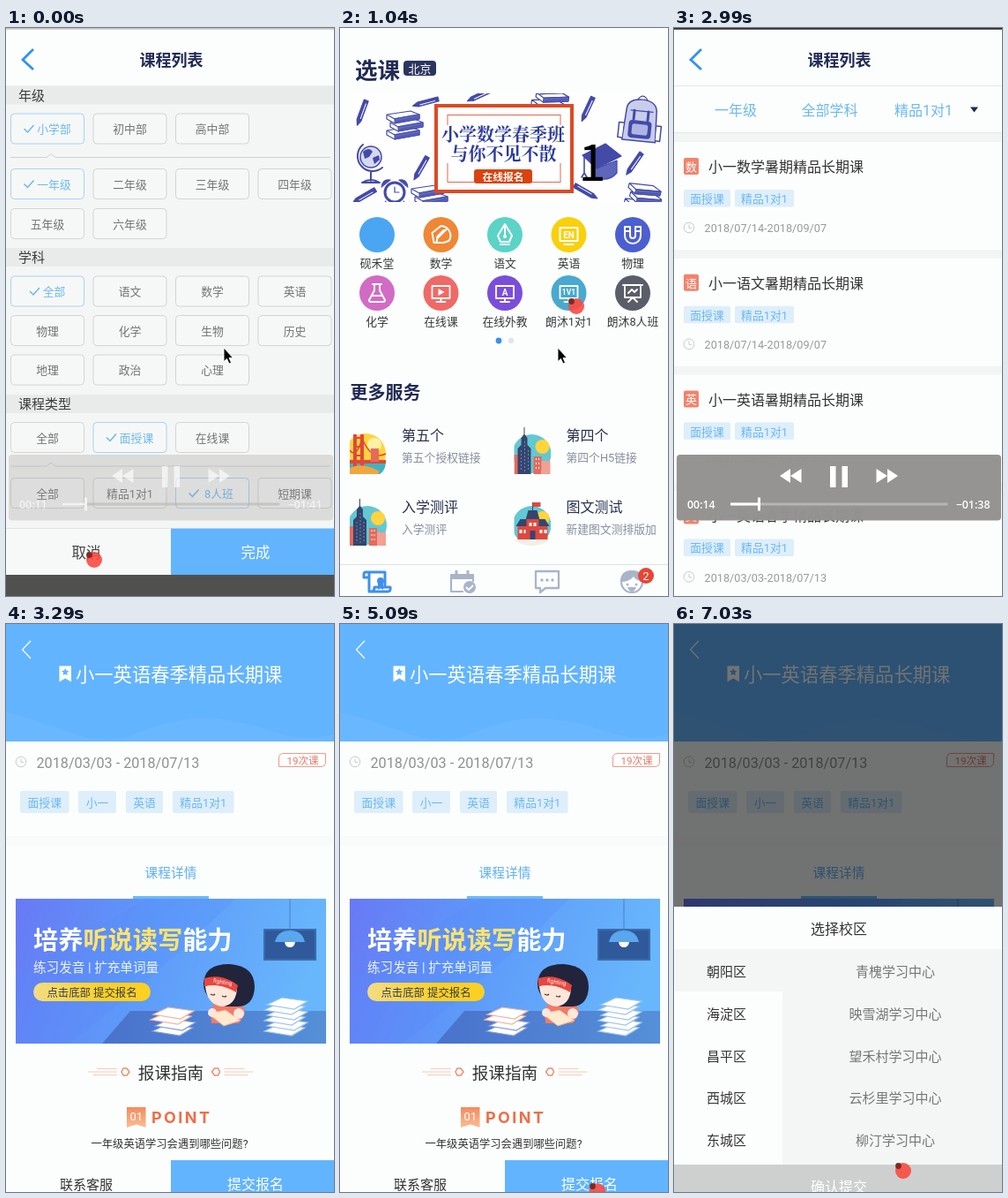
These frames come from a looping animation (372 px wide and 643 px high, 8 s). An HTML page:

```html
<!DOCTYPE html>
<html lang="zh-CN">
<head>
<meta charset="utf-8">
<title>课程列表</title>
<style>
html, body { margin: 0; width: 100%; height: 100%; overflow: hidden; background: #fcfefd; }
svg { display: block; width: 100vw; height: 100vh; }
text { font-family: Roboto, "Noto Sans CJK SC", "Noto Sans CJK", sans-serif; white-space: pre; }
.cjk { font-family: "Noto Sans CJK SC", "Noto Sans CJK", sans-serif; }
.serif { font-family: "Noto Serif CJK SC", "Noto Serif", "Noto Sans CJK SC", serif; }
.num { font-family: "Open Sans", "Noto Sans", sans-serif; font-weight: 600; }
.wide { font-family: Inter, sans-serif; font-weight: 700; }
</style>
</head>
<body>
<svg id="stage" viewBox="0 0 372 643" preserveAspectRatio="none"></svg>
<script>
const NAVY = '#222a55', SKY = '#6bb8f2', BLUE = '#62b4ff', PAPER = '#fcfefd', INK = '#434aa8';
const MID = 'text-anchor="middle"', BOLD = 'font-weight="700"';

// Text is placed by the vertical centre of its glyphs.
const text = (x, cy, s, size, fill, more = '') =>
  `<text x="${x}" y="${cy + size * .37}" font-size="${size}" fill="${fill}" ${more}>${s}</text>`;
const mid = (x, cy, s, size, fill, more = '') => text(x, cy, s, size, fill, MID + ' ' + more);
const box = (x, y, w, h, fill, r = 0, more = '') =>
  `<rect x="${x}" y="${y}" width="${w}" height="${h}" rx="${r}" fill="${fill}" ${more}/>`;
const disc = (x, y, r, fill, more = '') => `<circle cx="${x}" cy="${y}" r="${r}" fill="${fill}" ${more}/>`;
const shape = (d, fill, more = '') => `<path d="${d}" fill="${fill}" ${more}/>`;
const line = (d, color, w = 1, more = '') =>
  `<path d="${d}" fill="none" stroke="${color}" stroke-width="${w}" ${more}/>`;
const at = (x, y, body, more = '') => `<g transform="translate(${x} ${y}) ${more}">${body}</g>`;
const round = 'stroke-linecap="round" stroke-linejoin="round"';

const back = line('M31 24L19 36 31 47', '#2d94f0', 2.8);
const title = back + mid(187.5, 36, '课程列表', 18, NAVY, BOLD);
const clock = (x, y) => at(x, y, disc(0, 0, 5.8, 'none', 'stroke="#c9cbcb"') + line('M0-3.5V.5H3.2', '#c9cbcb'));
const chip = (x, y, w, h, s) => box(x, y, w, h, '#deeefb', 2) + mid(x + w / 2, y + h / 2 + .5, s, 12.8, SKY);

/* Filter page */
const COLS = [5.5, 99, 192.5, 286];
function optionRow(y, names, chosen) {
  return names.map((name, i) => {
    const on = i === chosen, cx = COLS[i] + 41.5;
    const frame = box(COLS[i], y, 83, 34, '#f6f8f7', 4, `stroke="${on ? '#a6d2f4' : '#d2d5d4'}"`);
    const tick = on ? line(`M${cx - name.length * 6.5 - 7} ${y + 17}l4 4 7-8`, SKY, 1.5) : '';
    return frame + tick + mid(cx + (on ? 7.5 : 0), y + 17.5, name, 12.8, on ? SKY : '#717473');
  }).join('');
}
const section = (y, s) => box(0, y, 372, 21, '#e9ebea') + text(14, y + 10.5, s, 15, '#3b3d3d');
const divider = y => line(`M5 ${y}H46l5-4 5 4H368`, '#d0d3d2');

const filterPage = box(0, 0, 372, 643, '#f4f6f5') + box(0, 0, 372, 65, PAPER) + title +
  section(65.5, '年级') + optionRow(97, ['小学部', '初中部', '高中部'], 0) + divider(146.5) +
  optionRow(159.5, ['一年级', '二年级', '三年级', '四年级'], 0) + optionRow(204.5, ['五年级', '六年级']) +
  section(249, '学科') + optionRow(281, ['全部', '语文', '数学', '英语'], 0) +
  optionRow(325.5, ['物理', '化学', '生物', '历史']) + optionRow(370, ['地理', '政治', '心理']) +
  section(415, '课程类型') + optionRow(446.5, ['全部', '面授课', '在线课'], 1) + divider(496) +
  optionRow(509.5, ['全部', '精品1对1', '8人班', '短期课'], 2) +
  box(0, 566.5, 187, 53, '#f7f9f8') + line('M0 566.5H187', '#e3e5e4') + mid(91, 593.5, '取消', 16.5, '#444') +
  box(187, 566.5, 185, 53, BLUE) + mid(283, 593.5, '完成', 16.5, '#fff') + box(0, 619, 372, 24, '#50514f');

/* Course list */
const COURSES = [['数', '小一数学暑期', '2018/07/14-2018/09/07'], ['语', '小一语文暑期', '2018/07/14-2018/09/07'],
  ['英', '小一英语暑期', '2018/07/14-2018/09/07'], ['英', '小一英语春季', '2018/03/03-2018/07/13']];
const course = ([tag, name, dates], i) => at(0, 129 + i * 131.8,
  box(0, 0, 372, 122, PAPER) + box(11, 18, 17, 19, '#f2836d', 2) + mid(19.5, 28, tag, 13, '#fff') +
  text(39, 28, name + '精品长期课', 16, '#333') + chip(11, 54, 53, 19.5, '面授课') + chip(69, 54, 67, 19.5, '精品1对1') +
  clock(17, 97) + text(34.5, 97.7, dates, 12.7, '#979a9a'));
const listPage = box(0, 0, 372, 643, '#f3f5f4') + box(0, 0, 372, 118, PAPER) + title +
  line('M0 65.5H372M0 118.5H372', '#e6e8e8') + mid(70, 93, '一年级', 16, SKY) + mid(176.5, 93, '全部学科', 16, SKY) +
  mid(283, 93, '精品1对1', 16, SKY) + shape('M336 89.5h9l-4.500 6z', NAVY) + COURSES.map(course).join('');

/* Home page */
const sketch = (d, w = 1.2, fill = 'none') => shape(d, fill, `stroke="${INK}" stroke-width="${w}" ${round}`);
const books = (x, y, turn = 0) => at(x, y, [0, 1, 2].map(i => at(i % 2 * 4 - 2, i * 9 - 14,
  sketch('M-17 0L10-4 20 0-8 5zM-17 0V5L-8 10 20 5V0', 1.2, '#fff') + sketch('M-8 5V10L20 5V0z', 1, '#6067bd') +
  sketch('M-6 8L18 3', .8))).reverse().join(''), `rotate(${turn})`);
const pencil = (x, y, turn) => at(x, y, sketch('M-2.500-14H2.500V10L0 16-2.500 10z', 1.2, INK) +
  line('M1-11V8', '#fff', 1) + sketch('M-2.500-11H2.500'), `rotate(${turn})`);
const globe = at(35, 146, disc(0, 0, 12, '#d5d8f1', `stroke="${INK}" stroke-width="1.500"`) +
  shape('M-9-6Q-2-12 2-6L-2 0-7 2zM2 1l7-3 1 5-6 5z', INK) + sketch('M-9-14A17 17 0 1 0 13 12M0 17V27M-10 29Q0 23 10 29z', 2));
const alarm = at(62, 186, disc(0, 0, 11, '#fff', `stroke="${INK}" stroke-width="3"`) +
  sketch('M0-6V0H5M-10 10l-4 5M10 10l4 5') + sketch('M-15-6Q-14-16-5-14zM15-6Q14-16 5-14z', 1, INK));
const bag = at(341, 104, sketch('M-17-12Q-16-23 0-23 15-23 17-12L19 24H-19z', 1.5, '#c9cdec') +
  box(-13, 1, 26, 20, INK, 4) + sketch('M-12-10H13M-6-22Q0-32 6-22') + box(-9, 5, 18, 12, '#aeb4e3', 2) +
  sketch('M-8-10V0M8-10V0', 3) + sketch('M-19 5h-5V22h5M19 5h5V22h-5', 1.500, '#fff'), 'rotate(6)');
const cap = at(299, 150, sketch('M-24-6L2-19 20-5-8 9z', 1.2, INK) + sketch('M-13 8V18Q5 26 15 14V0L-8 9z', 1.2, '#5f66bb') +
  sketch('M-22-4V14l-3 5M-22 14l3 5', 1.6));
const banner = `<clipPath id="strip">${box(15, 74, 350, 123, '#000')}</clipPath><g clip-path="url(#strip)">` +
  box(15, 74, 350, 123, '#fefefe') + pencil(25, 95, 20) + pencil(92, 158, 30) + pencil(98, 84, 75) + pencil(281, 91, 25) +
  pencil(334, 153, 35) + pencil(278, 185, -60) + pencil(159, 76, 65) + pencil(28, 190, 60) +
  books(72, 112) + books(100, 196) + books(343, 194, 15) + books(237, 80, 8) + globe + alarm + bag + cap + '</g>' +
  box(109, 88, 154, 97, '#fefefe', 0, 'stroke="#dc4a25" stroke-width="4"') +
  box(122, 98.5, 128, 76, 'none', 0, 'stroke="#dc6a50"') + box(114, 110, 142, 43, '#fefefe') +
  mid(185, 121, '小学数学春季班', 20, '#2d3b9b', 'class="serif" ' + BOLD) +
  mid(185.5, 142.5, '与你不见不散', 20, '#2d3b9b', 'class="serif" ' + BOLD) +
  box(152, 160, 66, 16, '#d9430f', 3) + mid(185, 168.5, '在线报名', 11.8, '#fff', BOLD) +
  mid(286, 152, '1', 56, '#000', 'class="cjk"');

const white = (d, w = 2) => line(d, '#fff', w, round);
const monitor = inner => white('M-10-8H10V6H-10zM-5 10H5M0 6V10', 1.8) + inner;
const SUBJECTS = [
  ['#4aa6f2', '砚禾堂', ''],
  ['#ef8736', '数学', white('M-10-2L0-10A11 11 0 0 1 9 7L3 9-8 9zM-4 4L6-6M-5 9L-4 2 3-5')],
  ['#5bd3c6', '语文', white('M0-12L8 1 5 8H-5L-8 1zM0-11V1M-5 11H5') + disc(0, 2, 2, '#fff')],
  ['#f9d00c', '英语', white('M-10-8H10V7H-10zM-5 11H5') + mid(0, 0, 'EN', 10, '#fff', BOLD)],
  ['#4b5fd0', '物理', white('M-9-9H-3V1A3 3 0 0 0 3 1V-9H9V1A9 9 0 0 1-9 1zM-9-4H-3M3-4H9')],
  ['#d26bc4', '化学', white('M-5-10H5M-3-10V-3L-9 8Q-9 10-7 10H7Q9 10 9 8L3-3V-10M-6 3H6')],
  ['#ef6a66', '在线课', monitor(shape('M-3-5L4-1-3 3z', '#fff'))],
  ['#7a4edb', '在线外教', monitor(mid(0, -1, 'A', 10, '#fff', BOLD))],
  ['#49a9cf', '朗沐1对1', monitor(mid(0, -1, '1V1', 8.5, '#fff', BOLD))],
  ['#5b5e69', '朗沐8人班', white('M-11-9H11M-9-9V5H9V-9M0 5L-5 10M0 5L5 10M-5 0L-1-4 2-1 5-4', 1.8)]
];
const subject = ([color, name, icon], i) => {
  const x = 42 + i % 5 * 72.5, y = 234 + (i > 4) * 66;
  return disc(x, y, 20, color) + at(x, y, icon) + mid(x, y + 32, name, 12.8, '#36383a');
};

const scene = body => disc(20, 30, 22, '#62c8d3') + disc(32, 22, 8, '#ffd43c') + body;
const bridge = disc(18, 30, 23, '#ffd43c') + shape('M0 40H41Q40 50 34 53H0z', '#3fb3c4') + disc(28, 20, 8, '#fff0a8') +
  line('M0 26Q8 36 14 12 24 38 41 30', '#e2473a', 1.5) + box(4, 8, 4, 42, '#e2473a') + box(12, 8, 4, 42, '#e2473a') +
  line('M6 12H14M6 22H14M6 32H14', '#e2473a', 2) + box(0, 37, 41, 4, '#e2473a') + box(24, 24, 9, 15, '#e8695a') +
  shape('M0 46Q15 39 34 50L32 53H0z', '#f0a63c');
const tower = scene(box(0, 31, 7, 22, '#e8695a') + box(22, 33, 9, 20, '#e8695a') + box(31, 38, 10, 15, '#f2a093') +
  shape('M11 0h1V8l3 4v8l4 4V53H4V24l4-4v-8l3-4z', '#34466f') + line('M8 26V50M12 16V50M16 26V50', '#7386ab', 1, 'stroke-dasharray="2 2"') +
  line('M25 35V50M28 35V50', '#fff', 1, 'stroke-dasharray="2 3"'));
const school = scene(box(4, 30, 34, 17, '#e0483f') + shape('M2 31L7 23H35L40 31z', '#34466f') + shape('M13 24L16 13H26L29 24z', '#34466f') +
  box(14, 23, 14, 24, '#e0483f') + box(18, 36, 6, 11, '#34466f') + line('M21 13V4', '#34466f') + shape('M21 4h9v5h-9z', '#e0483f') +
  line('M6 37H13M17 29H25M29 37H37', '#fff', 4, 'stroke-dasharray="3 2"') + shape('M0 46H40Q33 53 20 53T0 46', '#f4efe6'));
const SERVICES = [['第五个', '第五个授权链接', bridge], ['第四个', '第四个H5链接', tower],
  ['入学测评', '入学测评', tower], ['图文测试', '新建图文测排版加', school]];
const service = ([name, note, pic], i) => at(11 + i % 2 * 186.5, 452 + (i > 1) * 81,
  `<g clip-path="url(#pic)">${pic}</g>` + text(59, 9.5, name, 16, '#2a3050') + text(59, 34.5, note, 12.8, '#878d9e'));

const GREY = '#aab4c9';
const tabs = line('M0 607.5H372', '#dfe2e4') +
  at(42, 627, line('M-9 10V-11H-13Q-15-11-15-8V-5H-9M-9-11H9V4M-9 11H12Q16 11 15 6H-3Q-3 11-7 11', '#3f90ec', 3, round) +
    disc(4, -1, 4, '#3f90ec') + shape('M1 1h6v8l-3-2-3 2z', '#3f90ec')) +
  at(139, 627, line('M12-1V-8H-13V11H0', GREY, 2.2, round) + box(-13, -9, 25, 6, GREY) + line('M-7-13V-8M6-13V-8', GREY, 3) +
    disc(8, 6, 7, GREY) + line('M4 6l3 3 5-5', '#fff', 1.8)) +
  at(235, 627, line('M-13-12H13V7H-2L-8 12V7H-13z', GREY, 2.3, round) + [-6, 0, 6].map(x => disc(x, -2, 1.7, GREY)).join('')) +
  at(331, 627, disc(0, 0, 12, PAPER, `stroke="${GREY}" stroke-width="2.2"`) + shape('M-13 0Q-13-13 0-13T13 0Q5-1 2-6-3 0-13 0', GREY) +
    disc(-5, 3, 1.5, GREY) + disc(5, 3, 1.5, GREY) + shape('M-5 6H5Q3 11 0 11T-5 6', GREY)) +
  disc(347, 620, 9, '#e94434') + mid(347, 620, '2', 13, '#fff');
const homePage = box(0, 0, 372, 643, PAPER) + text(17, 48, '选课', 25.5, NAVY, BOLD) +
  box(72, 37, 37, 17, '#2c3560', 4) + mid(90.5, 46, '北京', 13, '#fff') + banner + SUBJECTS.map(subject).join('') +
  disc(180, 354, 3.4, '#3b90f1') + disc(194, 354, 3.2, '#e2e5e9') + text(11.5, 412.5, '更多服务', 20, NAVY, BOLD) +
  `<clipPath id="pic">${box(0, 0, 42, 53, '#000')}</clipPath>` + SERVICES.map(service).join('') + tabs;

/* Course detail */
const sheets = (x, y, n, color) => at(x, y, Array.from({ length: n }, (_, i) =>
  at(i % 2 * 3, -i * 6, shape('M-23 1L-6-7 23-3 8 6z', '#fff', `stroke="${color}" stroke-width="1.2"`))).join(''));
const girl = shape('M232 437Q236 426 254 426 270 427 271 441L264 452H233z', '#f07a6c') +
  shape('M224 407Q225 385 253 385 282 387 282 411 281 432 264 433H250Q224 426 224 407', '#22243c') +
  shape('M226 410Q244 402 262 414 260 432 245 433 228 431 226 410', '#fde6da') +
  shape('M225 401Q245 395 263 409L261 417Q243 406 225 410z', '#e8473f') +
  text(235, 405, 'fighting', 6.5, '#fff', 'transform="rotate(10 245 405)"') +
  line('M232 419q3 2 5 0M245 421q3 2 5 0', '#44303a', 1.2) +
  shape('M229 441L249 437 266 449 247 455z', '#ffe9cf', 'stroke="#f0a983"') + disc(234, 440, 5, '#fde6da') + disc(264, 441, 6, '#fde6da');
const hero = '<linearGradient id="sky" x2="1" y2=".15"><stop stop-color="#6879f5"/><stop offset=".45" stop-color="#5d99f9"/><stop offset="1" stop-color="#68b6fc"/></linearGradient>' +
  '<linearGradient id="desk"><stop stop-color="#4a72cc"/><stop offset="1" stop-color="#5590d8"/></linearGradient>' +
  '<linearGradient id="pill"><stop stop-color="#f3dc83"/><stop offset=".6" stop-color="#fbd022"/></linearGradient>' +
  box(11, 311, 352, 164, 'url(#sky)') + shape('M11 400Q90 350 160 311H260Q170 400 70 475H11z', '#5487f6', 'opacity=".25"') +
  shape('M109 475L141 438H363V475z', 'url(#desk)') +
  box(293, 346, 58, 34, '#30599c', 0, 'stroke="#3d6bac" stroke-width="2"') + line('M322 311V348', '#4a7fc8') +
  shape('M305 360Q308 347 322 347T339 360z', '#5aa7ee') + shape('M316 360h12q-1 6-6 6t-6-6', '#fffbe8') +
  text(31, 357.5, '培养<tspan fill="#ffe36c">听说读写</tspan>能力', 28.2, '#fff', 'font-weight="700"') +
  text(31, 388.5, '练习发音 | 扩充单词量', 14.6, '#eef4ff') +
  box(31, 406, 133, 21, 'url(#pill)', 10.5) + mid(97.5, 417, '点击底部 提交报名', 12.4, '#343a52', 'font-weight="500"') +
  sheets(189, 460, 2, '#7d9ce0') + sheets(187, 447, 2, '#f5b3a0') + sheets(316, 460, 6, '#9fc4ee') + girl;
const ornament = line('M103 503.500H126M93 507H126M99 510.500H126', '#f7cbbb') +
  shape('M131 507l2-4h4l3 4-3 4h-4z', 'none', 'stroke="#ef8d72" stroke-width="1.5"');
const detailPage = box(0, 0, 372, 643, PAPER) + box(0, 0, 372, 133, BLUE) +
  shape('M0 100Q35 108 70 122T140 128Q185 106 225 107T300 121 372 125V133H0z', '#70bcff', 'opacity=".5"') +
  line('M28 19L18.500 29 28 39', '#fff', 1.2) + shape('M60.500 47.500h13.500v18l-6.700-4-6.800 4z', '#fff') +
  shape('M67.200 50l1.300 2.700 3 .4-2.200 2 .6 3-2.700-1.400-2.700 1.400.6-3-2.200-2 3-.4z', BLUE) +
  text(79, 57.5, '小一英语春季精品长期课', 21.3, '#fff', 'font-weight="300"') +
  clock(17, 156) + text(34.5, 157.5, '2018/03/03 - 2018/07/13', 16.2, '#8e9191') +
  shape('M315 146.500H362.500V156Q362.500 161.500 357 161.500H309.500V152Q309.500 146.500 315 146.500', 'none', 'stroke="#ee9a8d"') +
  mid(336.5, 154.5, '19次课', 11.6, '#e87a6b') +
  chip(16, 189, 55.5, 25, '面授课') + chip(82, 189, 43, 25, '小一') + chip(136, 189, 42, 25, '英语') + chip(189, 189, 69.5, 25, '精品1对1') +
  box(0, 240, 372, 11, '#f9fbfa') + mid(187, 281.5, '课程详情', 14.7, '#5fb0f4') + box(144, 308, 86, 3, '#6cb9f6') + hero +
  mid(187, 508.5, '报课指南', 18.6, '#333') + ornament + at(373.5, 0, ornament, 'scale(-1 1)') +
  '<linearGradient id="flag" x2="0" y2="1"><stop stop-color="#f28c5e"/><stop offset="1" stop-color="#f9bd94"/></linearGradient>' +
  shape('M137 547H158.500V570L148 566.500 137 570z', 'url(#flag)') + mid(147.7, 557.5, '01', 13, '#fff') +
  text(165, 558.5, 'POINT', 18, '#ee6e47', 'class="wide" letter-spacing="2.4"') +
  mid(185.5, 588.5, '一年级英语学习会遇到哪些问题?', 12.3, '#333') +
  box(0, 607, 187, 36, PAPER) + mid(91, 634.5, '联系客服', 15, '#333') +
  box(187, 607, 185, 36, BLUE) + mid(283, 634.5, '提交报名', 16, '#fff', 'font-weight="500"');

/* Campus picker */
const AREAS = ['朝阳区', '海淀区', '昌平区', '西城区', '东城区'];
const CAMPUSES = ['青槐', '映雪湖', '望禾村', '云杉里', '柳汀'];
const sheet = box(0, 0, 372, 320, '#000', 0, 'opacity=".55"') + box(0, 320, 372, 323, PAPER) +
  mid(187, 345, '选择校区', 16, '#333') + line('M0 368.500H372', '#eceeed') +
  box(0, 368, 123, 48, '#f4f6f5') + box(123, 368, 249, 244, '#f4f6f5') +
  AREAS.map((s, i) => mid(59.5, 393.5 + i * 47.8, s, 15, '#333') +
    mid(251, 393.5 + i * 47.8, CAMPUSES[i] + '学习中心', 15, '#747776')).join('') +
  box(0, 612, 372, 31, '#cdd0ce') + mid(187, 637, '确认提交', 16, '#fff');

/* Player bar, pointer and touch mark */
const rewind = shape('M132 499V515L120 507zM144.500 499V515L132 507z', '#fff');
const player = box(0, 0, 372, 1.8, '#333') + box(3, 483, 368, 74.5, '#949290', 4, 'opacity=".98"');
const controls = rewind + at(374, 0, rewind, 'scale(-1 1)') + box(177, 496, 6.5, 24, '#fff') + box(190.5, 496, 6.5, 24, '#fff') +
  box(64, 537.5, 246.5, 3, '#b8b6b4', 1) + `<rect id="played" x="64" y="537.5" height="3" fill="#fff"/><rect id="knob" y="531.5" width="3" height="15" fill="#fff"/>` +
  text(15, 539, '', 12.4, '#fff', 'id="past" class="num"') + text(358.5, 539, '', 12.4, '#fff', 'id="left" class="num" text-anchor="end"');
const arrow = shape('M247 362V377.500L250.500 374.500 253 380 255.500 379 253 373.500H257.500z', '#000', 'stroke="#fff" stroke-width=".9"');
const touch = disc(0, 0, 9, '#fb4a43', 'opacity=".9"') + disc(-5.5, -5.5, 3.4, '#7e2a22');

const layer = (id, body) => `<g id="${id}">${body}</g>`;
const svg = document.getElementById('stage');
svg.innerHTML = layer('filter', filterPage) + layer('list', listPage) + layer('home', homePage) + layer('detail', detailPage) +
  layer('sheet', sheet) + layer('arrow', arrow) + layer('player', player) + layer('controls', controls) + layer('touch', touch);
const $ = id => document.getElementById(id);
const show = (id, on) => $(id).setAttribute('display', on ? 'inline' : 'none');

const LOOP = 8000;
// start, page, touch position, pointer shown
const STEPS = [[0, 'filter', [100, 602], true], [150, 'list', null, true], [1040, 'home', [268, 315], true],
  [2090, 'list', null, true], [2540, 'list', null, false], [3140, 'detail', null, false], [4040, 'list', [196, 589], false],
  [5090, 'detail', [292, 642], false], [6140, 'sheet', null, false], [7030, 'sheet', [260, 619], false]];
// start, player opacity, seconds played
const BAR = [[0, .27, 11], [150, 0, 11], [2540, .5, 13], [2690, 1, 13], [2840, 1, 14], [3140, .27, 14], [3290, 0, 14]];
const current = (rows, t) => rows.filter(row => row[0] <= t).pop();
const stamp = s => `0${Math.floor(s / 60)}:${String(s % 60).padStart(2, '0')}`;

function render(t) {
  const [, page, tap, pointer] = current(STEPS, t), [, alpha, sec] = current(BAR, t);
  for (const id of ['filter', 'list', 'home']) show(id, id === page);
  show('detail', page === 'detail' || page === 'sheet');
  show('sheet', page === 'sheet');
  show('arrow', pointer);
  show('touch', tap);
  if (tap) $('touch').setAttribute('transform', `translate(${tap})`);
  $('player').setAttribute('opacity', alpha);
  $('controls').setAttribute('opacity', alpha ** .35);
  const x = 68 + sec * 2;
  $('played').setAttribute('width', x - 64);
  $('knob').setAttribute('x', x - 1);
  $('past').textContent = stamp(sec);
  $('left').textContent = '−' + stamp(112 - sec);
}

const begin = performance.now();
function tick() {
  render((performance.now() - begin) % LOOP);
  requestAnimationFrame(tick);
}
tick();
</script>
</body>
</html>
```
